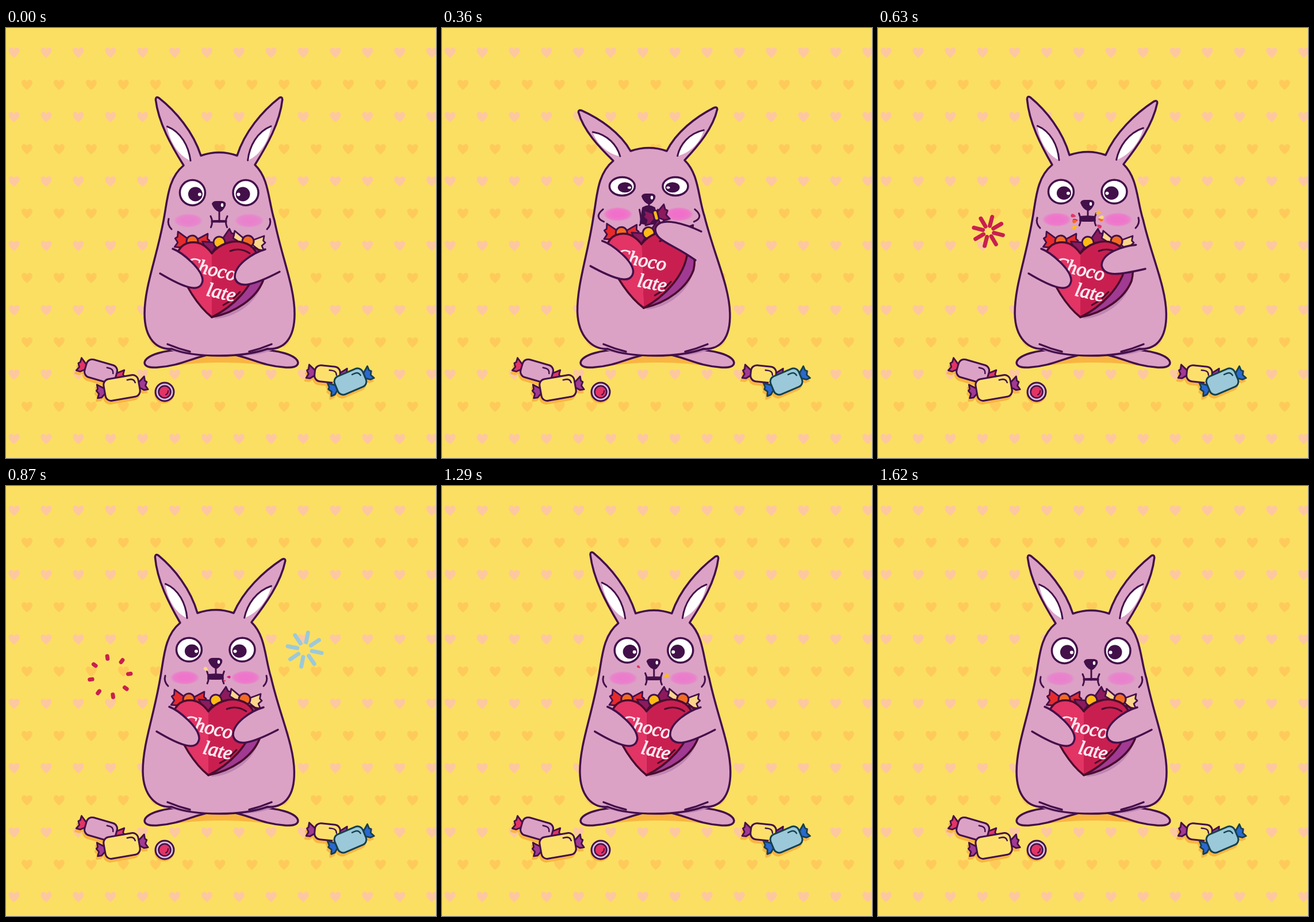
Recreate the animation shown at these times as an HTML page with a canvas. Size 748 by 748 pixels, loop 1650 ms.

```html
<!DOCTYPE html>
<html lang="en">
<head>
<meta charset="utf-8">
<title>Chocolate bunny</title>
<style>
  html, body { margin: 0; height: 100%; overflow: hidden; background: #fbdf62; }
  canvas { display: block; }
</style>
</head>
<body>
<canvas id="stage" width="748" height="748"></canvas>
<script>
const c = document.getElementById('stage').getContext('2d');
c.lineJoin = c.lineCap = 'round';

const LOOP = 1650, STEP = 30;
const INK = '#43104a', BOX_INK = '#4a0c2e', FUR = '#dca2c6', FUR_DARK = '#bf86b4', RED = '#e23465',
  DEEP = '#c91f50', PURPLE = '#a13a92', MAROON = '#8d1a5c', ORANGE = '#f26a21', YELLOW = '#fdbb14',
  CREAM = '#fbd68a', LEMON = '#fde06c', BLUE = '#9cc9d9', SHADE = '#f9b541', MAGENTA = '#e0158b';

const clamp = x => Math.min(1, Math.max(0, x));
const ramp = (t, from, to) => (1 - Math.cos(Math.PI * clamp((t - from) / (to - from)))) / 2;
const pulse = (t, rise, top, fall, end) => ramp(t, rise, top) - ramp(t, fall, end);
const random = seed => { const v = Math.sin(seed * 12.9898) * 43758.5453; return v - Math.floor(v); };

// One bite, a spell of chewing with a gulp near its end, then the ears perk up
function poseAt(t) {
  const bite = pulse(t, 30, 350, 370, 600), chew = pulse(t, 350, 600, 1080, 1440),
    gulp = pulse(t, 930, 1050, 1060, 1200), perk = pulse(t, 1050, 1200, 1260, 1500);
  return {
    lean: -11 * bite - 6 * chew,
    headY: -8 * bite - chew - 2 * gulp,
    faceY: -13 * bite - 2 * chew - 3 * gulp,
    open: .05 + .95 * bite + .2 * chew + .1 * gulp,
    mouthY: 337 + 2 * bite - 2 * chew - 2 * gulp,
    eyeH: 22 - 6 * bite - 1.5 * chew - 1.5 * gulp,
    blush: .35 + .65 * bite + .45 * chew,
    leftTip: [263 - 23 * bite - chew - 7 * gulp - 2 * perk, 123 + 22 * bite - chew - 5 * perk],
    rightTip: [478 - 2 * bite + 5 * chew + 2 * gulp - 2 * perk, 123 + 17 * bite + 6 * chew + 2 * gulp - perk],
    boxX: -9 * bite - 6 * chew,
    boxY: -16 * bite - 3 * gulp,
    boxTurn: -2 * bite,
    lift: pulse(t, 30, 350, 370, 760)
  };
}

function draw(path, fill, stroke, width = 3.5) {
  const p = typeof path === 'string' ? new Path2D(path) : path;
  if (fill) { c.fillStyle = fill; c.fill(p); }
  if (stroke) { c.strokeStyle = stroke; c.lineWidth = width; c.stroke(p); }
}

function oval(x, y, rx, ry, fill, stroke, width) {
  const p = new Path2D();
  p.ellipse(x, y, rx, ry, 0, 0, 7);
  draw(p, fill, stroke, width);
}

function placed(x, y, degrees, paint) {
  c.save();
  c.translate(x, y);
  c.rotate(degrees * Math.PI / 180);
  paint();
  c.restore();
}

function mirrored(axis, paint) {
  paint();
  c.save();
  c.translate(2 * axis, 0);
  c.scale(-1, 1);
  paint();
  c.restore();
}

function candy(x, y, turn, w, h, r, fill, wrap, len, half, ink = INK, shine = false) {
  placed(x, y, turn, () => {
    const at = (a, b) => `${w / 2 + len * a},${half * b}`;
    const fan = `M${at(-.1, -.25)}L${at(.8, -1)}L${at(.8, -.4)}L${at(1, -.2)}L${at(.75, .25)}` +
      `L${at(1, .8)}L${at(.5, .8)}L${at(-.1, .3)}Z`;
    mirrored(0, () => draw(fan, wrap, ink, 2.8));
    const body = new Path2D();
    body.roundRect(-w / 2, -h / 2, w, h, r);
    draw(body, fill, ink, 3);
    if (shine) draw(`M${w / 2 - 19},${-h / 2 + 7}h5q7,0 8,7`, null, ink, 2.5);
  });
}

function floorCandy(x, y, turn, w, h, fill, wrap, ink = INK) {
  candy(x - 2, y + 5, turn, w, h, 10, SHADE, SHADE, 14, 13, SHADE);
  candy(x, y, turn, w, h, 10, fill, wrap, 14, 13, ink, true);
}

function background() {
  c.fillStyle = '#fbdf62';
  c.fillRect(0, 0, 748, 748);
  const heart = new Path2D('M0,9C-6,4-9.5,0-9.5,-4C-9.5,-9-3,-11 0,-6C3,-11 9.5,-9 9.5,-4C9.5,0 6,4 0,9Z');
  for (let row = 0; row < 13; row++) for (let col = 0; col < 14; col++) {
    const odd = row % 2;
    placed((odd ? 36.5 : 14) + col * 55.9, 43 + row * 56, 0, () => draw(heart, odd ? '#fecb5b' : '#fdc8a0'));
  }
}

function litter() {
  floorCandy(165, 597, 16, 55, 32, FUR, RED);
  floorCandy(201.5, 626, -10, 61, 38, LEMON, PURPLE);
  oval(275, 637, 17, 16, SHADE);
  oval(276, 633, 16, 16, '#d9c0dc', INK, 3);
  oval(276, 633, 10.5, 10.5, RED, INK, 2.5);
  draw('M278,638q4,-2 4,-7', null, INK, 2);
  floorCandy(559, 602, 6, 44, 28, LEMON, PURPLE);
  floorCandy(599, 615, -23, 53, 34, BLUE, '#2a68d0', '#16404c');
}

// Coordinates along an ear (a) and across it (b)
function earFrame(outer, inner, tip) {
  const mid = outer.map((v, i) => (v + inner[i]) / 2);
  return (a, b) => mid.map((m, i) => m + a * (tip[i] - m) + b * (inner[i] - outer[i]));
}

function body({ lean, headY, leftTip, rightTip }) {
  const at = (x, y, k = 1) => [x + lean * k, y + headY * k];
  const l = earFrame(at(309, 239), at(339, 222), leftTip);
  const r = earFrame(at(433, 238), at(402, 222), rightTip);

  draw('M275,590Q330,572 374,568Q415,572 474,590Q420,581 374,582Q330,581 275,590Z', SHADE);
  mirrored(374.5, () => {
    draw('M241,582C243,570 275,558 320,560L360,567C325,572 305,588 262,590.5C250,591 241,589 241,582Z', FUR, INK);
    draw('M285,560Q335,560 350,568Q318,573 285,560Z', FUR_DARK);
  });

  draw(`M288,558C262,560 ${at(241, 540, .4)} ${at(241, 497, .5)}
    C${at(241, 450, .55)} ${at(262, 400, .75)} ${at(274, 335, .95)}
    C${at(281, 300)} ${at(281, 262)} ${l(0, -.5)}
    C${l(.32, -.55)} ${l(.69, -.55)} ${l(1, -.09)}Q${l(1.04, 0)} ${l(1, .09)}
    C${l(.72, .5)} ${l(.35, .76)} ${l(0, .5)}
    Q${at(371, 211)} ${r(0, .5)}
    C${r(.35, .76)} ${r(.72, .5)} ${r(1, .09)}Q${r(1.04, 0)} ${r(1, -.09)}
    C${r(.69, -.55)} ${r(.32, -.55)} ${r(0, -.5)}
    C${at(458, 262)} ${at(456, 300)} ${at(467, 335, .95)}
    C${at(480, 400, .6)} ${at(502, 450, .2)} ${at(502, 497, .1)}
    C502,540 484,560 455,558
    C430,567 400,570 371,570C340,570 310,567 288,558Z`, FUR, INK);
  mirrored(371.5, () => draw('M281,550Q300,558 320,563', null, INK));

  for (const e of [l, r]) {
    const arch = `M${e(.59, -.25)}C${e(.43, .22)} ${e(.2, .2)} ${e(.01, -.08)}`;
    draw(`${arch}C${e(.15, -.5)} ${e(.41, -.51)} ${e(.59, -.25)}Z`, '#fff');
    draw(arch, null, INK, 3);
  }
}

function face({ lean, faceY, open, mouthY, eyeH, blush }) {
  const bulge = Math.max(0, open - .35) * 14;
  for (const side of [-1, 1]) {
    placed(370 + side * 53 + lean, 335 + faceY * .85, 0, () => {
      c.scale(1, .48);
      const glow = c.createRadialGradient(0, 0, 10, 0, 0, 26);
      const tint = `hsla(${315 + blush * 3},${64 + blush * 18}%,${72 - blush * 3}%,`;
      glow.addColorStop(0, tint + '1)');
      glow.addColorStop(.6, tint + '.8)');
      glow.addColorStop(1, tint + '0)');
      oval(0, 0, 26, 26, glow);
    });
    placed(370.7 + side * 46.3 + lean, 286.5 + faceY * .85, 0, () => {
      const k = eyeH / 22;
      oval(0, 0, 22, eyeH, '#fff', INK);
      oval(-side * 5, 2.5 * k, 12.5, 12.5 * k, INK);
      oval(-side * 12.5, 3 * k, 3, 3 * k, '#fff');
    });
    placed(371 + lean, 341 + faceY, 0, () => {
      c.scale(side, 1);
      draw(`M${88 - bulge * .9},${-9 - bulge * .4}Q${91 + bulge * .6},1 ${83 - bulge * .5},9`, null, INK, 3);
    });
  }
  placed(370.5 + lean, mouthY, 0, () => {
    const w = 12.5 + open * 1.5, top = -26 * open;
    draw(`M${-w},0L${-w + open * 4},${top}Q0,${top * 1.25} ${w - open * 4},${top}L${w},0Q0,${open * 4} ${-w},0Z`, INK, INK, 3);
    mirrored(0, () => draw(`M${w + 2},${-9 - open * 14}Q${w - 3},0 ${w + 1.5},${10 - open * 6}`, null, INK, 3));
  });
  placed(lean, faceY, 0, () => {
    draw(`M371,318V${mouthY - faceY}`, null, INK, 3);
    draw('M359,306Q360,302 366,302H376Q383,303 381,309Q376,319 371,319Q363,317 359,306Z', INK, INK, 2);
    oval(376, 308, 2.2, 3.2, '#fff');
  });
}

function chocolateBox() {
  const left = 'M358,392C348,378 335,371 321,373C303,376 292,392 301,412C308,445 335,485 358,503',
    right = 'M358,392C372,375 395,368 412,373C432,378 442,395 437,412C430,450 395,485 358,503';
  draw('M447,440C438,478 400,504 362,506L400,470Z', FUR_DARK);
  candy(324, 371, 4, 20, 20, 10, ORANGE, '#e62a2c', 20, 15);
  candy(421, 371, 10, 20, 20, 10, ORANGE, CREAM, 20, 14);
  candy(371, 373, -25, 20, 20, 10, YELLOW, MAROON, 20, 14);
  draw('M432,382C452,388 451,425 447,440C435,470 400,495 358,503Z', PURPLE, BOX_INK);
  draw(left + 'Z', RED);
  draw(right + 'Z', DEEP);
  draw(left, null, BOX_INK);
  draw(right, null, BOX_INK);
  draw('M390,388Q407,381 424,392M378,482L390,475M396,470L407,459', null, BOX_INK, 3);
  c.fillStyle = c.strokeStyle = '#fbe9f0';
  c.font = 'italic 34px "Liberation Serif", "Times New Roman", serif';
  c.lineWidth = 1.2;
  for (const [word, x, y] of [['Choco', 311, 420], ['late', 347, 465]])
    placed(x, y, 13, () => { c.fillText(word, 0, 0); c.strokeText(word, 0, 0); });
}

// The right arm swings from the box up to the mouth, carrying a sweet
function rightArm({ lean, lift }, t) {
  const resting = [[451, 385], [430, 391], [397, 412], [398, 434], [403, 455], [430, 448], [476, 424]];
  const raised = [[451, 354], [430, 344], [378, 324], [371, 349], [370, 371], [400, 374], [441, 404]];
  const p = resting.map(([x, y], i) =>
    [x + (raised[i][0] - x) * lift + lean * .5 * (1 - lift), y + (raised[i][1] - y) * lift]);
  if (t > 150 && t < 450) candy(p[3][0] + 1, p[3][1] - 23, -15, 8, 18, 4, YELLOW, MAROON, 18, 15);
  draw(`M${p[0]}C${p.slice(1, 4)}C${p.slice(4)}`, FUR, INK);
}

// A spray after the bite, then stray crumbs while chewing
function crumbs(t, { lean, mouthY }) {
  const colors = [RED, YELLOW, ORANGE, MAGENTA, CREAM];
  for (let i = 0; i < 17; i++) {
    const age = (t - (i < 8 ? 520 + i * 4 : 720 + (i - 8) * 60)) / 200;
    if (age <= 0 || age >= 1) continue;
    const angle = (i % 2 ? 180 : 0) + (random(i + 1) - .5) * 80;
    placed(370 + lean, mouthY - 4, angle, () => {
      c.translate(16 + (8 + 14 * random(i + 40)) * age, 0);
      c.scale(Math.sin(age * Math.PI), Math.sin(age * Math.PI));
      draw('M-5,0Q0,-4 3,-3Q6,0 3,3Q0,4 -5,0Z', colors[i % 5]);
    });
  }
}

function burst(t, color, start, x, y, drift) {
  const p = (t - start) / 400;
  if (p <= 0 || p >= 1) return;
  const inner = 36 * p, outer = 36 * (1 - (1 - p) ** 4);
  for (let i = 0; i < 8; i++)
    placed(x + drift * p, y - 37 * p, 25 - 38 * p + i * 45,
      () => draw(`M${Math.min(inner, outer)},0H${outer}`, null, color, 7));
}

function render(t) {
  const pose = poseAt(t);
  background();
  litter();
  body(pose);
  face(pose);
  placed(358 + pose.boxX, 450 + pose.boxY, pose.boxTurn, () => {
    c.translate(-358, -450);
    chocolateBox();
    draw('M290,384C306,390 343,420 342,440C338,462 310,452 268,427', FUR, INK);
  });
  rightArm(pose, t);
  crumbs(t, pose);
  burst(t, DEEP, 520, 197, 364, -18);
  burst(t, BLUE, 725, 513, 298, 18);
  burst(t, ORANGE, 890, 219, 398, -18);
}

function tick() {
  render(Math.floor(performance.now() % LOOP / STEP) * STEP);
  requestAnimationFrame(tick);
}
tick();
</script>
</body>
</html>
```
